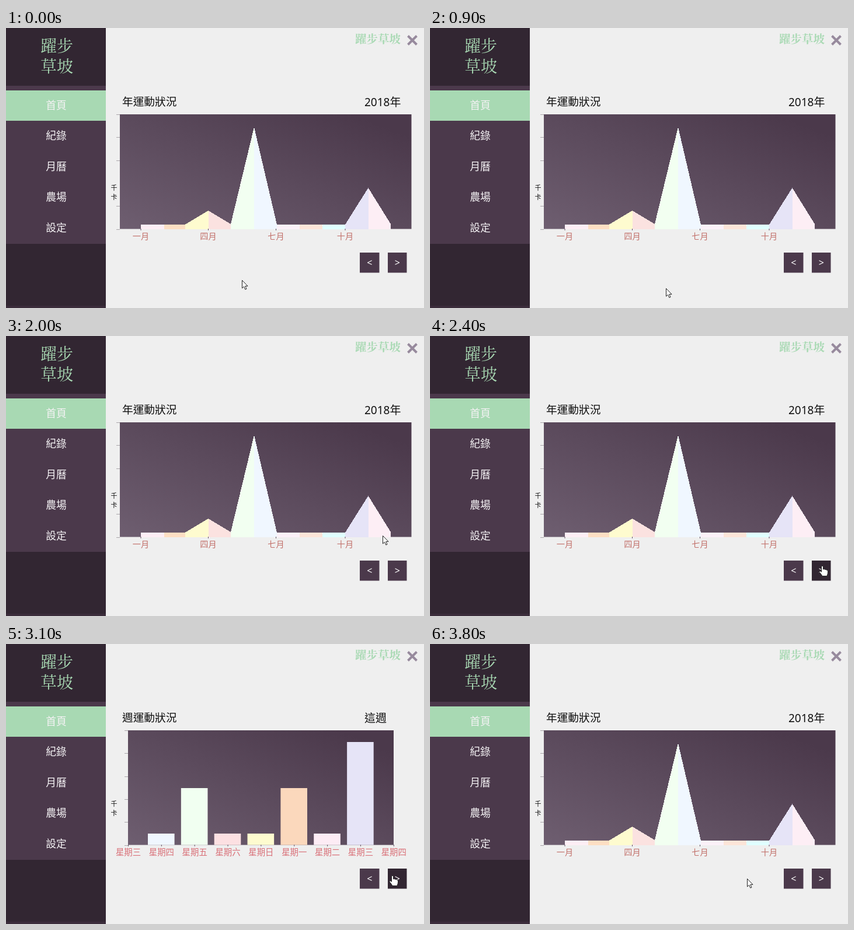
Write an HTML page that moves like this. It is 716 by 480 pixels and loops after 3900 ms.

```html
<!DOCTYPE html>
<html lang="zh-Hant">
<head>
<meta charset="utf-8">
<style>
html, body { margin: 0; width: 100%; height: 100%; overflow: hidden; background: #efefef; }
svg { display: block; width: 716px; height: 480px; }
text { font-family: "Noto Sans CJK TC", "Noto Sans CJK", "Noto Sans", sans-serif; }
.brand { font-family: "Noto Serif CJK TC", "Noto Serif CJK", "Noto Serif", "Noto Sans CJK TC", serif; font-weight: 500; }
.small { font-weight: 700; }
.light { font-weight: 300; }
.latin { font-family: "Noto Sans", "Noto Sans CJK TC", "Noto Sans CJK", sans-serif; }
.crisp { shape-rendering: crispEdges; }
</style>
</head>
<body>
<svg id="stage" viewBox="0 0 716 480">
  <defs>
    <linearGradient id="plum" x1="0" y1="1" x2="1" y2="0">
      <stop offset="0" stop-color="#6e5e70"/>
      <stop offset=".5" stop-color="#5b4a5c"/>
      <stop offset=".9" stop-color="#4b394b"/>
    </linearGradient>
  </defs>
</svg>
<script>
const NS = "http://www.w3.org/2000/svg";
const stage = document.getElementById("stage");
const LOOP = 3900, STEP = 100, BASE = 344.5;
const DARK = "#322632", PLUM = "#4b394b", MINT = "#a8d9b3";

function add(parent, tag, attrs, label) {
  const el = document.createElementNS(NS, tag);
  for (const key in attrs) el.setAttribute(key, attrs[key]);
  if (label) el.textContent = label;
  parent.appendChild(el);
  return el;
}
const rect = (parent, x, y, width, height, fill) => add(parent, "rect", { x, y, width, height, fill });
const line = (parent, d, stroke, width = 1) => add(parent, "path", { d, stroke, "stroke-width": width, fill: "none" });
// y is the middle of the characters
const text = (parent, label, x, y, size, fill, anchor = "middle", cls = "") =>
  add(parent, "text", { x, y: y + size * 0.37, "font-size": size, fill, "text-anchor": anchor, class: cls }, label);

function sidebar() {
  rect(stage, 0, 0, 171, 480, DARK);
  rect(stage, 0, 99, 171, 271, PLUM);
  rect(stage, 0, 107, 171, 52, MINT);
  rect(stage, 0, 476, 171, 4, "#3a2c3a");
  text(stage, "躍步", 87, 31, 28, MINT, "middle", "brand");
  text(stage, "草坡", 87, 66, 28, MINT, "middle", "brand");
  ["首頁", "紀錄", "月曆", "農場", "設定"].forEach((name, i) =>
    text(stage, name, 86, 132 + i * 52.5, 17.8, "#f4f2f4", "middle", "light"));
}

function header() {
  text(stage, "躍步草坡", 637, 19, 19.5, MINT, "middle", "brand small");
  line(stage, "M688.5 13.5L703.5 28.5M703.5 13.5L688.5 28.5", "#978a9d", 4);
}

function plot(group, left, right, skip) {
  rect(group, left, 148, right - left, BASE - 148, "url(#plum)");
  for (let i = 0; i < 6; i++)
    if (i !== skip) line(group, `M${left - 6} ${Math.round(148 + i * 39.3) + .5}h6`, "#aaa6aa");
}

function titles(group, name, span) {
  const g = add(group, "g", {});
  text(g, name, 199, 126.5, 18.7, "#111", "start", "light");
  text(g, span, 614, 126.5, 19, "#111", "start", "latin light");
  return g;
}

function axisLabel(group, name, x, size, fill) {
  line(group, `M${x} 344v3`, "#665566");
  text(group, name, x, 357, size, fill);
}

function yearChart() {
  const g = add(stage, "g", {});
  titles(g, "年運動狀況", "2018年");
  plot(g, 195, 694.5, 3);
  const xs = [231, 270.5, 306.5, 346.5, 385, 425, 464, 503, 542, 581, 620.5, 659];
  const tops = [337, 337, 337, 313, 336, 170, 337, 337, 337, 337, 274, 336];
  const fills = ["#fdeef5", "#fddfc3", "#fefbcf", "#fbe2e0", "#f2fff1", "#f0f7ff",
    "#fbf1f8", "#fce5d8", "#e0feff", "#e6e4f7", "#fdeef5"];
  fills.forEach((fill, i) => add(g, "path", {
    d: `M${xs[i]} ${BASE}V${tops[i]}L${xs[i + 1]} ${tops[i + 1]}V${BASE}Z`, fill, class: "crisp" }));
  ["一月", "四月", "七月", "十月"].forEach((name, i) =>
    axisLabel(g, name, [231, 346.5, 462.5, 581][i], 14.2, "#c2706a"));
  return g;
}

function weekChart() {
  const g = add(stage, "g", {});
  const heads = titles(g, "週運動狀況", "這週");
  plot(g, 209, 664);
  const tops = [325, 247, 325, 325, 247, 325, 168];
  const fills = ["#f0f7ff", "#f1fff1", "#fce0e2", "#fefbcf", "#fbd8bc", "#fdecf5", "#e6e4f7"];
  tops.forEach((top, i) => rect(g, 243 + i * 56.85, top, 45.6, BASE - top, fills[i]));
  [..."三四五六日一二三四"].forEach((day, i) =>
    axisLabel(g, "星期" + day, 209.5 + i * 56.85, 14.4, "#d96f77"));
  return { g, heads };
}

function button(x, width, sign) {
  const top = 385, height = 34.5;
  const box = rect(stage, x, top, width, height, PLUM);
  text(stage, sign, x + width / 2, 402.5, 16, "#fff", "middle", "latin");
  return { box, holds: (px, py) => px >= x && px <= x + width && py >= top && py <= top + height };
}

const cursor = d => add(stage, "path", { d, fill: "#fff", stroke: "#222", "stroke-width": 1, "stroke-linejoin": "round" });

sidebar();
header();
const year = yearChart();
const week = weekChart();
text(stage, "千", 185, 273.5, 11, "#111");
text(stage, "卡", 185, 289.5, 11, "#111");
const prev = button(606, 33.5, "<");
const next = button(654, 32.5, ">");
const arrow = cursor("M.5 .5V14L3.6 11.2L5.8 16.2L8 15.2L5.8 10.4H10Z");
const hand = cursor("M-1.5 1Q0-1 1.5 1V6Q3.5 4.8 4.5 6.4Q6.4 5.6 7.2 7.2Q9.5 6.8 9.5 9V12Q9.2 14.5 7.8 17.5H0Q-2 14-5 10.8Q-5.4 8.6-3.4 9L-1.5 10.6Z");

// time, x, y of the pointer tip
const path = [
  [0, 404, 432], [600, 404, 444], [900, 404, 446], [1200, 483, 320], [1600, 527, 211],
  [1800, 590, 250], [2200, 699, 433], [2400, 672, 394], [3000, 672, 394],
  [3500, 622, 407], [3600, 598, 405], [3800, 543, 402]
];

function pointer(t) {
  const i = path.findIndex(p => p[0] > t);
  if (i < 0) return path[path.length - 1].slice(1);
  const [a, b] = [path[i - 1], path[i]];
  const k = (t - a[0]) / (b[0] - a[0]);
  return [1, 2].map(n => Math.round(a[n] + (b[n] - a[n]) * k));
}

const show = (el, on) => el.setAttribute("visibility", on ? "visible" : "hidden");

function draw(ms) {
  const t = Math.floor((ms % LOOP) / STEP) * STEP;
  const onWeek = t >= 2500 && t < 3600;
  show(year, !onWeek);
  show(week.g, onWeek);
  week.heads.setAttribute("opacity", t === 3500 ? .38 : 1);

  const [x, y] = pointer(t);
  const pressed = t >= 2500 && t <= 3000;
  const onPrev = prev.holds(x, y), onNext = next.holds(x, y);
  prev.box.setAttribute("fill", onPrev ? DARK : PLUM);
  next.box.setAttribute("fill", onNext && !pressed ? DARK : PLUM);
  show(hand, onPrev || onNext);
  show(arrow, !onPrev && !onNext);
  for (const c of [hand, arrow]) c.setAttribute("transform", `translate(${x} ${y})`);
}

const start = performance.now();
function tick() {
  draw(performance.now() - start);
  requestAnimationFrame(tick);
}
draw(0);
requestAnimationFrame(tick);
</script>
</body>
</html>
```
